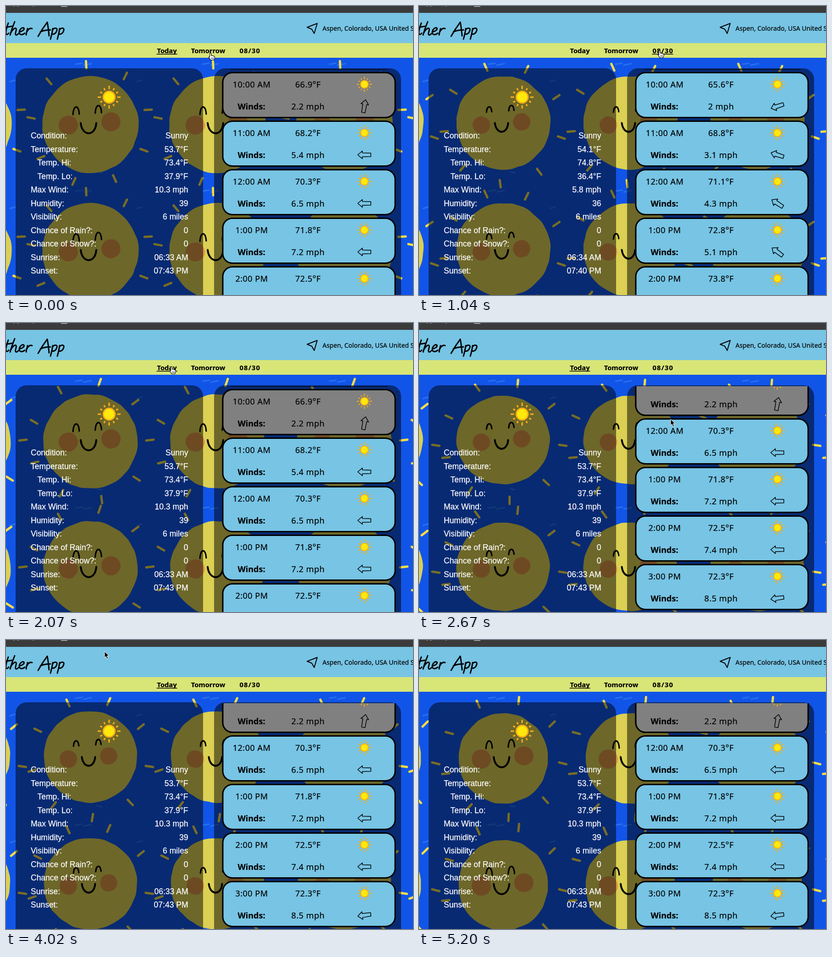
Animation of 888x631 px, one loop 5220 ms. Source, as an HTML page:

```html
<!DOCTYPE html>
<html lang="en">
<head>
<meta charset="utf-8">
<title>Weather forecast</title>
<style>
html, body { margin: 0; width: 100%; height: 100%; overflow: hidden; background: #1155e8; }
svg { display: block; width: 100%; height: 100%; }
.ui { font-family: "Noto Sans", "Open Sans", sans-serif; stroke: #000; stroke-width: .2; }
.list { font-size: 18px; letter-spacing: .52px; text-anchor: middle; }
.bold { font-weight: 700; letter-spacing: 0; }
.facts { font: 17.5px "Liberation Sans", Arial, sans-serif; fill: #fff; stroke: #fff; stroke-width: .25; }
.nav { font-size: 14.7px; font-weight: 700; text-anchor: middle; }
.line { fill: none; stroke: #000; stroke-linecap: round; stroke-linejoin: round; }
</style>
</head>
<body>
<svg viewBox="0 0 888 631" preserveAspectRatio="none">
  <defs>
    <g id="sun"></g>
    <g id="icon"></g>
    <path id="wind" d="M-14.5 0L-4.5 -8.5V-4.3L14 -3.8V3.8L-4.5 4.3V8.5Z" fill="none" stroke="#000" stroke-width="1.5" stroke-linejoin="round"/>
    <clipPath id="view"><rect x="454" y="138" width="408" height="493"/></clipPath>
  </defs>
  <rect width="888" height="631" fill="#1155e8"/>
  <g id="tiles"></g>
  <g fill-opacity=".5">
    <rect x="21" y="136" width="409" height="540" rx="24"/>
    <rect x="454" y="136" width="408" height="540" rx="24"/>
  </g>
  <use href="#icon" x="225" y="199"/>
  <g class="facts" id="facts"></g>
  <g clip-path="url(#view)"><g class="ui list" id="cards"></g></g>

  <rect width="888" height="15" fill="#3b3b3b"/>
  <path d="M16 0h3M24 0h4M58 0h3M121 0v1h12v-1" fill="none" stroke="#bbb" stroke-width="1.4"/>
  <rect y="15" width="888" height="66" fill="#77c4e4"/>
  <rect y="81" width="888" height="32" fill="#d8e577"/>
  <g class="line" stroke-width="2.9" transform="translate(0 -.7)" role="img" aria-label="Weather App">
    <path d="M5 38C2 46-1 56 0 61C1 64 4 63 6 60M-4 48L13 45"/>
    <path d="M19 35C15 45 11 56 9 64M10 60C14 52 20 47 22 50C24 53 19 60 21 63C22 65 25 64 27 61"/>
    <path d="M29 57C35 57 41 52 39 49C36 46 29 52 29 58C29 64 35 65 41 60"/>
    <path d="M47 50C46 55 44 60 44 64M45 58C48 52 52 48 57 50"/>
    <path d="M70 67C76 56 84 44 90 36C92 45 93 56 94 66M75 57C82 54 90 53 97 53"/>
    <path d="M102 50C101 58 99 66 97 73M101 54C105 47 113 48 111 54C109 61 103 64 100 61"/>
    <path d="M117 50C116 58 114 66 112 73M116 54C120 47 128 48 126 54C124 61 118 64 115 61"/>
  </g>
  <path class="line" stroke-width="2" d="M679 38L657 46.5L667 50.5L672.5 60Z"/>
  <text class="ui" x="690.5" y="54" font-size="13.9">Aspen, Colorado, USA United States of America</text>
  <g class="ui nav">
    <text x="351" y="103">Today</text>
    <text x="441" y="103">Tomorrow</text>
    <text x="532.3" y="103" letter-spacing="1.2">08/30</text>
  </g>
  <rect id="under" y="104.4" height="1.5"/>
  <path id="arrow" d="M0 0V13.5L3 10.8L5.2 16L7.8 15L5.5 9.8H9.8Z" stroke="#fff"/>
  <g id="hand" stroke="#000">
    <path d="M-1.5 1.2Q0-1 1.5 1.2V6Q3.4 5 4.3 6.6Q6.2 6 7 7.6Q9.3 7.4 9.4 9.6Q9.4 13 7.6 16H.6Q-1.6 12.6-3.6 10.2Q-4 8.4-1.5 9.4Z" fill="#fff" stroke-width="1.1" stroke-linejoin="round"/>
    <path d="M2 10.5v3.5M4.2 10.5v3.5M6.4 10.5v3.5" stroke-width=".8"/>
  </g>
</svg>
<script>
const LOOP = 5220, STEP = 148.1, LAST = 35, TILE = 277;
const BLUE = "#77c4e4", GREY = "#808080";
const $ = id => document.getElementById(id);
const ease = k => k * k * (3 - 2 * k);
const ramp = (n, from, to) => ease(Math.max(0, Math.min(1, (n - from) / (to - from))));
const noise = n => { const s = Math.sin(n * 127.1 + 11.7) * 43758.5453; return s - Math.floor(s) - .5; };
const p = v => v.toFixed(1);

// key drawings of the sun: step, turn of the ray ring, half width, half height, smile width
const poses = [
  [0, -174, 105, 106, 34], [7, -147, 103, 102, 29], [11, -147, 103, 103, 34], [18, -156, 102, 97, 29],
  [22, -166, 108, 100, 31], [27, -152, 102, 100, 29], [35, -155, 98, 99, 34]
];
// pointer moves: leaving step, arriving step, x, y
const moves = [[2, 6, 525, 97], [8, 11, 361, 95], [13, 16, 549, 210], [19, 22, 188, 62], [24, 27, 215, 25], [27, 30, 222, 12]];

const labels = ["Condition:", "Temperature:", "Temp. Hi:", "Temp. Lo:", "Max Wind:", "Humidity:", "Visibility:",
  "Chance of Rain?:", "Chance of Snow?:", "Sunrise:", "Sunset:"];
// hours: temperature, wind speed, wind arrow turn
const today = {
  nav: [328.5, 45], facts: ["53.7°F", "73.4°F", "37.9°F", "10.3 mph", 39, "06:33 AM", "07:43 PM"],
  rows: [[66.9, 2.2, 100], [68.2, 5.4, 0], [70.3, 6.5, 0], [71.8, 7.2, 0], [72.5, 7.4, 0], [72.3, 8.5, -8]]
};
const later = {
  nav: [508.5, 46], facts: ["54.1°F", "74.8°F", "36.4°F", "5.8 mph", 36, "06:34 AM", "07:40 PM"],
  rows: [[65.6, 2, -18], [68.8, 3.1, 18], [71.1, 4.3, 33], [72.8, 5.1, 37], [73.8, 5.6, 37]]
};
const tomorrow = {
  nav: [402.5, 77], facts: ["54.3°F", "73.9°F", "37.2°F", "7.6 mph", 37, "06:33 AM", "07:42 PM"],
  rows: later.rows.map((row, i) => row.map((v, j) => +p((v + today.rows[i][j]) / 2)))
};
const days = [today, tomorrow, later];

function blob(cx, cy, rx, ry, seed, count, rough) {
  const pts = Array.from({ length: count }, (_, i) => {
    const a = i / count * 2 * Math.PI, r = 1 + noise(seed + i) * rough;
    return [cx + rx * r * Math.cos(a), cy + ry * r * Math.sin(a)];
  });
  const half = (a, b) => p((a[0] + b[0]) / 2) + " " + p((a[1] + b[1]) / 2);
  return "M" + half(pts[count - 1], pts[0]) +
    pts.map((q, i) => `Q${p(q[0])} ${p(q[1])} ${half(q, pts[(i + 1) % count])}`).join("") + "Z";
}

function rays(turn, seed) {
  let d = "";
  for (let i = 0; i < 9; i++) {
    const a = (turn + 40 * i) * Math.PI / 180, b = a + noise(seed + i) * .4;
    const x = 184 + 130 * Math.cos(a), y = 258 + 130 * Math.sin(a), dx = 8 * Math.cos(b), dy = 8 * Math.sin(b);
    d += `M${p(x - dx)} ${p(y - dy)}L${p(x + dx)} ${p(y + dy)}`;
  }
  return d;
}

// between key drawings the ring turns on and the outline is redrawn
function sun(n) {
  const near = poses.reduce((a, b) => Math.abs(b[0] - n) < Math.abs(a[0] - n) ? b : a);
  const [key, turn, rx, ry, smile] = near, grin = smile - 29, seed = n * 80;
  const eyeW = smile * .2, eyeY = 226 + grin * .5, eyeH = 6 + grin * .5, r = 19.5 + grin * .4;
  const eye = (x, y) => `M${p(x - eyeW)} ${p(y + eyeH)}c1 ${p(-2.6 * eyeH)} ${p(2 * eyeW - 1)} ${p(-2.6 * eyeH)} ${p(2 * eyeW)} -1`;
  const cheek = (x, y, s) => `<path d="${blob(x, y, r, r, seed + s, 14, .06)}" fill="#de9646"/>`;
  return `<path d="M152 127l14-2M170 129l16-3M199 362l10 2M286 165l11-3" stroke="#489af8" stroke-width="3" stroke-linecap="round" opacity=".4"/>
    <path d="${blob(184, 255 + grin * .7, rx, ry, seed, 50, .025)}" fill="#dbd053"/>
    ${cheek(136, 260, 51)}${cheek(224 + grin, 253, 65)}
    <path class="line" stroke-width="3.2" d="${eye(153, eyeY)}${eye(201.5, eyeY - 3)}"/>
    <path class="line" stroke-width="4" d="M${180 - smile / 2} 255.5c3 ${p(smile * .88)} ${smile - 2} ${p(smile * .88)} ${smile} 0"/>
    <path d="${rays(turn + 13 * (n - key), seed)}" stroke="#f3dc49" stroke-width="5" stroke-linecap="round"/>`;
}

function card(y, row, hour, fill) {
  const box = `<rect x="473" y="${p(y)}" width="376" height="98" rx="21" fill="${fill}" stroke-width="3"/>`;
  if (!row) return box;
  return box + `<g transform="translate(0 ${p(y)})">
    <text x="536" y="32">${hour}</text><text x="659" y="32">${row[0]}°F</text>
    <use href="#icon" transform="translate(782 25.5) scale(.66)"/>
    <text class="bold" x="535.5" y="80">Winds:</text><text x="659" y="80">${row[1]} mph</text>
    <use href="#wind" transform="translate(782 73.5) rotate(${row[2]})"/></g>`;
}

function cards(day, scroll) {
  const top = i => 145.5 + 106 * i - 148 * scroll;
  const hour = i => (i < 3 ? 10 + i : i - 2) + ":00 " + (i < 3 ? "AM" : "PM");
  const list = day.rows.map((row, i) => card(top(i), row, hour(i), BLUE)).join("");
  // the current hour stays pinned over the row it replaces
  const current = day === today ? card(145.5 - 42 * scroll, today.rows[0], hour(0), GREY) : "";
  return card(top(-1), null, "", BLUE) + list + current;
}

function facts(day) {
  const values = ["Sunny", ...day.facts.slice(0, 5), "6 miles", 0, 0, ...day.facts.slice(5)];
  return labels.map((text, i) => {
    const y = p(289.2 + 29.5 * i), x = text.startsWith("Temp.") ? 68.5 : 54;
    return `<text x="${x}" y="${y}">${text}</text><text x="397.5" y="${y}" text-anchor="end">${values[i]}</text>`;
  }).join("");
}

function pointer(n) {
  let x = 446, y = 102;
  for (const [from, to, toX, toY] of moves) {
    const k = ramp(n, from, to);
    x += (toX - x) * k;
    y += (toY - y) * k;
  }
  return [x, y];
}

function draw(n) {
  const day = n < 2 || n > 12 ? today : n < 6 ? tomorrow : later;
  $("sun").innerHTML = sun(n);
  $("facts").innerHTML = facts(day);
  $("cards").innerHTML = cards(day, ramp(n, 14, 18));
  $("under").setAttribute("x", day.nav[0]);
  $("under").setAttribute("width", day.nav[1]);
  const [x, y] = pointer(n);
  const link = y > 85 && y < 113 && days.some(({ nav: [left, width] }) => x >= left && x <= left + width);
  for (const id of ["arrow", "hand"]) {
    $(id).setAttribute("transform", `translate(${p(x)} ${p(y)})`);
    $(id).style.display = n <= 30 && link === (id === "hand") ? "" : "none";
  }
}

let spokes = "";
for (let i = 0; i < 12; i++) spokes += `<path d="M0 -17.5V-${i % 3 ? 22.5 : 25}" transform="rotate(${i * 30})"/>`;
$("icon").innerHTML = `<g stroke="#f5ac1b" stroke-width="3.2">${spokes}</g><g stroke="none"><circle r="14.3" fill="#f8ae16"/><circle r="11.2" fill="#ffe80c"/></g>`;
let tiles = "";
for (let r = 0; r < 2; r++)
  for (let c = -1; c < 4; c++) tiles += `<use href="#sun" x="${c * TILE}" y="${r * TILE}"/>`;
$("tiles").innerHTML = tiles;

let shown = -1;
const origin = performance.now();
function tick() {
  const t = (performance.now() - origin) % LOOP;
  const n = Math.min(LAST, Math.floor(t / STEP));
  if (n !== shown) draw(shown = n);
  requestAnimationFrame(tick);
}
tick();
</script>
</body>
</html>
```
